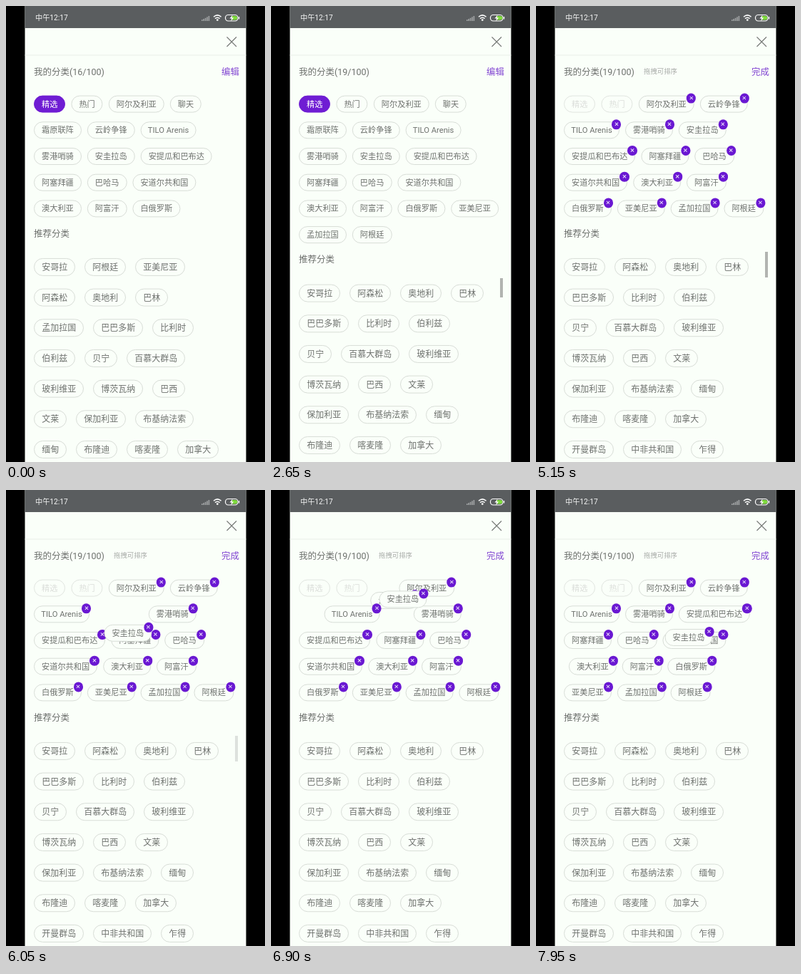
An HTML page that plays this animation: 363x640 px, repeating every 8000 ms.

```html
<!DOCTYPE html>
<html lang="zh-CN">
<head>
<meta charset="utf-8">
<title>分类管理</title>
<style>
  html, body { margin: 0; width: 100%; height: 100%; overflow: hidden; background: #000; }
  body { font-family: Roboto, "Noto Sans CJK SC", "Noto Sans CJK JP", sans-serif; color: #6e716e; }
  #stage { position: relative; width: 363px; height: 640px; overflow: hidden; background: #000; }
  #stage { --page: #fafff9; }
  #phone { position: absolute; left: 0; top: 0; }
  .label { position: absolute; left: 39px; height: 20px; line-height: 20px; font-size: 12.5px; white-space: pre; }
  #clock { left: 41px; top: 7px; font-size: 10.2px; color: #f4f5f5; }
  #title { top: 82.5px; }
  #hint { left: 151px; top: 81.5px; font-size: 9.4px; color: #a6a9a6; }
  #mode { left: 302px; top: 82.5px; font-size: 12.4px; color: #8145d2; }
  .pill { position: absolute; left: 0; top: 0; height: 24px; box-sizing: border-box; padding-top: 1px;
    border: 1px solid #d8ddd7; border-radius: 13px; background: var(--page);
    display: flex; align-items: center; justify-content: center;
    font-size: 11.2px; line-height: 1; white-space: pre; }
  .rec { height: 24.6px; font-size: 12px; }
  .active { background: #6f1dd3; border-color: #6f1dd3; color: #fff; font-weight: 500; }
  .edit .fixed { background: var(--page); border-color: #e1e5e0; color: #dcdfdb; font-weight: 400; }
  .badge { display: none; position: absolute; right: -3.4px; top: -3.8px; width: 13.4px; height: 13.4px;
    border-radius: 50%; background: #6a18d2; }
  .badge::before, .badge::after { content: ""; position: absolute; left: 3.7px; top: 6.2px;
    width: 6px; height: 1px; background: #e6d8fa; transform: rotate(45deg); }
  .badge::after { transform: rotate(-45deg); }
  .edit .badge { display: block; }
  #bar { position: absolute; left: 321px; width: 4px; background: #b1b4b0; }
</style>
</head>
<body>
<div id="stage">
  <svg id="phone" width="363" height="640" fill="none">
    <rect x="26.5" width="310" height="640" fill="#fafff9"/>
    <rect x="26.5" width="310" height="31" fill="#5a5d5f"/>
    <rect x="26.5" y="68.5" width="310" height="1" fill="#ebefea"/>
    <g fill="#a2a5a6">
      <rect x="274" y="19.2" width="1.6" height="1.8"/><rect x="276.4" y="18" width="1.6" height="3"/>
      <rect x="278.8" y="16.8" width="1.6" height="4.2"/><rect x="281.2" y="15.4" width="1.6" height="5.6"/>
      <rect x="283.6" y="14" width="1.6" height="7"/>
    </g>
    <g stroke="#fff" stroke-width="1.5">
      <path d="M291 15.2Q296.3 10.6 301.6 15.2M293 17.6Q296.3 14.8 299.6 17.6"/>
      <circle cx="296.3" cy="19.6" r=".7" fill="#fff"/>
    </g>
    <rect x="307.5" y="12.5" width="17.5" height="8.5" rx="4" stroke="#fff" stroke-width="1.2"/>
    <path d="M316 14h5.5a2.7 2.7 0 0 1 0 5.5H316z" fill="#7fdc3c"/>
    <path d="M317.5 12.5l-4 5h2.6l-1 4 4-5h-2.6z" fill="#fff"/>
    <path d="M326.6 15v3.5" stroke="#fff" stroke-width="1.2"/>
    <path d="M309.5 43.5l13.5 13.5M323 43.5l-13.5 13.5" stroke="#747774" stroke-width="1.1"/>
  </svg>
  <div class="label" id="clock">中午12:17</div>
  <div class="label" id="title"></div>
  <div class="label" id="hint">拖拽可排序</div>
  <div class="label" id="mode"></div>
  <div class="label" id="head">推荐分类</div>
  <div id="bar"></div>
</div>
<script>
const LOOP = 8000, MOVE = 250, FADE = 120;
const EDIT_AT = 2900, BAR_ON = 150, BAR_OFF = 5900;
const DRAG = '安圭拉岛', DRAG_AT = 5250;
const $ = id => document.getElementById(id);
const stage = $('stage');

const MINE = { pre: 'm', em: 11.2, pad: 22, gap: 8, pitch: 36.7, limit: 324 };
const REC = { pre: 'r', em: 12, pad: 22.4, gap: 12.6, pitch: 42.67, limit: 304 };

let mine = ('精选,热门,阿尔及利亚,聊天,霜原联阵,云岭争锋,TILO Arenis,雾港哨骑,安圭拉岛,安提瓜和巴布达,' +
  '阿塞拜疆,巴哈马,安道尔共和国,澳大利亚,阿富汗,白俄罗斯').split(',');
let rec = ('安哥拉,阿根廷,亚美尼亚,阿森松,奥地利,巴林,孟加拉国,巴巴多斯,比利时,伯利兹,贝宁,百慕大群岛,' +
  '玻利维亚,博茨瓦纳,巴西,文莱,保加利亚,布基纳法索,缅甸,布隆迪,喀麦隆,加拿大,开曼群岛,中非共和国,乍得').split(',');

// Edits to the two lists
const without = (list, name) => list.filter(n => n !== name);
const add = name => () => { rec = without(rec, name); mine = [...mine, name]; };
const drop = name => () => { mine = without(mine, name); rec = [...rec, name]; };
const moveTo = i => () => { mine = without(mine, DRAG); mine.splice(i, 0, DRAG); };

// [start, edit, delay before the others slide]
const events = [
  [100, add('亚美尼亚'), FADE],
  [1250, add('孟加拉国'), FADE],
  [1950, add('阿根廷'), FADE],
  [3600, drop('聊天'), FADE],
  [4550, drop('霜原联阵'), FADE],
  [5450, moveTo(5), 0],
  [6780, moveTo(2), 0],
  [7067, moveTo(10), 0],
  [7750, moveTo(13), 0]
];

// Pointer path of the dragged pill: time, centre x, centre y
const path = [
  [DRAG_AT, 233.4, 174.3], [5500, 172, 180], [5800, 152, 192], [6200, 182, 206], [6500, 208.5, 217],
  [6750, 190, 152], [6880, 186, 142], [7060, 176, 240], [7200, 172.5, 263], [7450, 190, 260],
  [7720, 258, 246], [7950, 214, 207], [LOOP, 212, 205]
];

const widthOf = (name, s) => s.pad + s.em * (/[a-z]/.test(name) ? 5 : name.length);

function flow(names, s, y, out) {
  let x = 39, rows = 1;
  for (const name of names) {
    const w = widthOf(name, s);
    if (x + w > s.limit) { x = 39; rows++; }
    out[s.pre + name] = { x, y: y + (rows - 1) * s.pitch };
    x += w + s.gap;
  }
  return rows;
}

function layout() {
  const pos = {};
  const rows = flow(mine, MINE, 137.6, pos);
  const head = 319.7 + (rows - 5) * MINE.pitch;
  flow(rec, REC, head + 46.5, pos);
  return { pos, head };
}

const states = [{ at: -1e4, delay: 0, ...layout() }];
for (const [at, edit, delay] of events) {
  edit();
  states.push({ at, delay, ...layout() });
}

const pills = {};
function makePill(key) {
  const own = key[0] === 'm', name = key.slice(1);
  const s = own ? MINE : REC, fixed = name === '精选' || name === '热门';
  const el = document.createElement('div');
  el.className = 'pill' + (own ? '' : ' rec') + (fixed ? ' fixed' : '') + (name === '精选' ? ' active' : '');
  el.textContent = name;
  const w = widthOf(name, s);
  el.style.width = w + 'px';
  if (own && name === DRAG) el.style.zIndex = 5;
  if (own && !fixed) el.appendChild(document.createElement('i')).className = 'badge';
  stage.appendChild(el);
  pills[key] = { el, w, h: own ? 24 : 24.6 };
}
for (const s of states) for (const key in s.pos) if (!pills[key]) makePill(key);

const clamp = v => Math.max(0, Math.min(1, v));
const ease = v => (1 - Math.cos(Math.PI * clamp(v))) / 2;
const mix = (a, b, p) => a + (b - a) * p;

function pointer(t) {
  const i = Math.max(1, path.findIndex(p => p[0] > t));
  const [a, b] = [path[i - 1], path[i]];
  const p = (t - a[0]) / (b[0] - a[0]);
  return [mix(a[1], b[1], p), mix(a[2], b[2], p)];
}

function place(key, x, y, alpha) {
  const { el, h } = pills[key];
  el.style.transform = `translate(${x.toFixed(2)}px, ${(y - h / 2).toFixed(2)}px)`;
  el.style.opacity = alpha;
  el.style.visibility = alpha > 0 ? 'visible' : 'hidden';
}

function draw(t) {
  const k = states.filter(s => s.at <= t).length - 1;
  const now = states[k], old = states[Math.max(0, k - 1)];
  const since = t - now.at;
  const p = ease((since - now.delay) / MOVE);

  for (const key in pills) {
    const a = old.pos[key], b = now.pos[key];
    if (a && b) place(key, mix(a.x, b.x, p), mix(a.y, b.y, p), 1);
    else if (a) place(key, a.x, a.y, 1 - clamp(since / FADE));
    else if (b) place(key, b.x, b.y, clamp((since - now.delay - MOVE / 2) / FADE));
    else place(key, 0, 0, 0);
  }
  if (t >= DRAG_AT) {
    const key = 'm' + DRAG, [x, y] = pointer(t);
    place(key, x - pills[key].w / 2, y, 1);
  }

  const head = mix(old.head, now.head, p), top = head + 25.3;
  $('head').style.top = head - 10 + 'px';
  $('bar').style.top = top + 'px';
  $('bar').style.height = 36 - (top - 345) / 4 + 'px';
  $('bar').style.opacity = t < BAR_ON ? 0 : 1 - clamp((t - BAR_OFF) / MOVE);

  const editing = t >= EDIT_AT;
  stage.className = editing ? 'edit' : '';
  $('mode').textContent = editing ? '完成' : '编辑';
  $('hint').style.visibility = editing ? 'visible' : 'hidden';
  $('title').textContent = `我的分类(${16 + Math.min(k, 3)}/100)`;
}

const start = performance.now();
function tick() {
  draw((performance.now() - start) % LOOP);
  requestAnimationFrame(tick);
}
tick();
</script>
</body>
</html>
```
